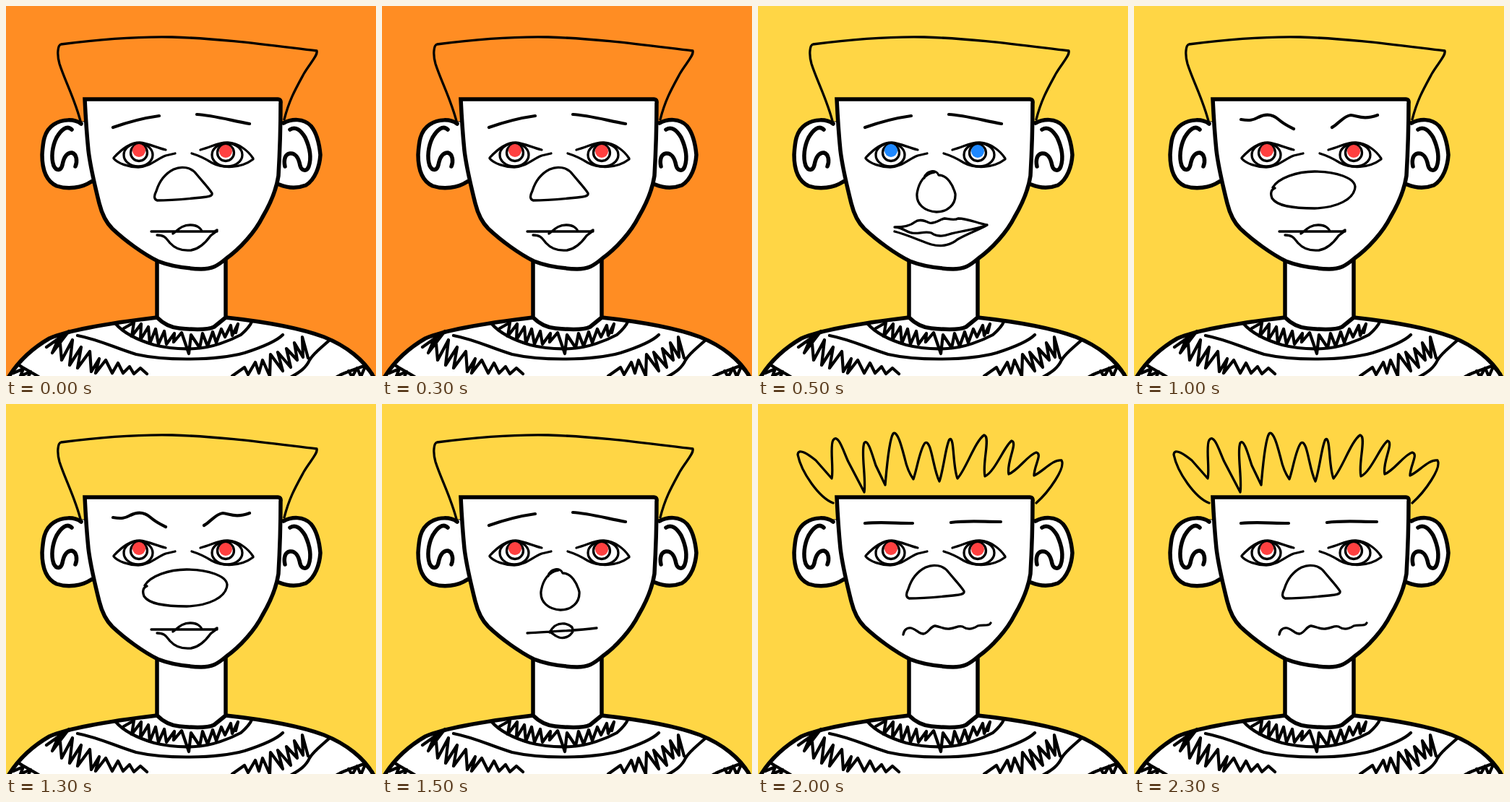
Write an HTML page that moves like this. It is 512 px wide and 512 px high and loops after 2500 ms.

```html
<!DOCTYPE html>
<html lang="en">
<head>
<meta charset="utf-8">
<title>Changing face</title>
<style>
  html, body { margin: 0; width: 100%; height: 100%; overflow: hidden; }
  svg { display: block; width: 100vw; height: 100vh; }
  path, circle, ellipse { stroke: #000; stroke-linecap: round; stroke-linejoin: round; }
  .solid { fill: #fff; stroke-width: 5.5; }
  .bold { fill: none; stroke-width: 5.5; }
  .line { fill: none; stroke-width: 4.2; }
  .fine { fill: none; stroke-width: 3.3; }
  #face { stroke-linejoin: miter; }
  #leftIris, #rightIris { stroke: none; }
</style>
</head>
<body>
<svg viewBox="0 0 512 512">
  <rect id="backdrop" width="512" height="512"/>

  <!-- jumper and neck -->
  <path class="solid" d="M2 516C14 496 34 475 60 460C90 447 150 438 209 431H304C350 436 400 443 440 458C470 470 497 490 510 516Z"/>
  <path class="solid" d="M209 352V431C218 440 228 445 240 446C260 448 280 448 288 444L304 431V349Z"/>
  <path class="line" d="M152 440C165 455 185 463 205 469C225 474 245 475 262 474C285 473 310 463 325 455C333 448 338 442 340 437"/>
  <path class="line" d="M163 446L177 438L174 457L187 440L186 462L197 444L199 467L207 447L211 468L219 450L222 468L233 453L232 465L243 452L253 481L256 455L268 473L272 453L279 471L286 451L291 466L298 447L303 458L311 442L313 456L321 440L318 452"/>
  <path class="line" d="M99 456C130 462 150 473 180 482C220 491 290 491 330 480C355 472 375 463 383 455"/>
  <path class="line" d="M56 472L87 450L64 480L74 457L77 490L92 462L88 497L104 472L99 501L116 478L118 506L129 488L124 508L138 490L147 508L155 494L162 508L171 499L177 509L186 501L195 509"/>
  <path class="line" d="M313 512L330 500L335 510L345 493L350 508L355 490L365 512L366 482L383 505L376 479L394 500L388 474L403 490L399 466L411 486L410 458L418 487"/>
  <path class="line" d="M447 463C436 473 425 481 420 490C415 501 406 507 395 513"/>
  <path class="line" d="M18 497C27 503 36 507 45 513M10 508L24 502L20 512L34 506L31 513M497 497C485 503 470 506 458 513M474 505L479 513L486 501L491 513L497 499L507 509"/>

  <!-- ears -->
  <path fill="#fff" stroke="none" d="M100 160H130V245H100ZM365 160H388V245H365Z"/>
  <path class="solid" d="M104 163C95 156 78 156 66 164C52 173 51 190 50 206C50 225 55 242 70 249C85 254 105 252 118 243"/>
  <path class="bold" d="M91 171C84 164 76 172 70 182C64 194 62 210 66 221C70 229 76 228 78 220C80 209 84 203 91 203C98 205 99 215 96 222"/>
  <path class="solid" d="M384 162C395 156 412 155 422 166C432 178 434 195 435 206C434 222 428 240 415 248C402 253 390 252 378 247"/>
  <path class="bold" d="M393 171C401 166 408 172 414 182C420 195 423 210 419 222C416 230 409 228 407 221C405 210 400 203 393 204C386 205 384 213 386 222"/>

  <path class="fine" id="hair"/>
  <path class="solid" id="face" d="M109 129H376Q381 129 380 135C380 170 379 200 377 235C374 255 365 275 355 292C345 312 325 335 304 350C292 360 285 364 270 364C245 363 225 359 210 353C190 343 165 325 147 308C137 298 132 285 129 273C122 245 117 225 114 200C111 170 110 150 109 129Z"/>

  <!-- eyes -->
  <path class="fine" d="M149 210C160 198 172 189 185 189C197 190 208 196 221 199M149 211C155 218 170 223 183 223C200 222 208 212 221 207L234 204"/>
  <path class="fine" d="M257 204C267 207 277 212 285 217C300 225 325 225 342 212M269 199C285 195 295 188 307 189C322 190 335 200 342 211"/>
  <ellipse class="fine" cx="183" cy="206" rx="20" ry="16"/>
  <ellipse class="fine" cx="306" cy="206" rx="21" ry="16"/>
  <circle class="fine" cx="184" cy="203" r="11.5"/>
  <circle class="fine" cx="304" cy="203" r="11.5"/>
  <circle id="leftIris" cx="184" cy="200" r="9"/>
  <circle id="rightIris" cx="304" cy="201" r="9"/>

  <path class="line" id="brows"/>
  <path class="fine" id="nose"/>
  <path class="fine" id="mouth"/>
</svg>
<script>
const hair = {
  flat: "M104 163C96 130 82 105 74 80C70 66 72 54 76 53C130 46 180 42 230 43C300 45 370 55 430 62C432 68 420 80 412 94C400 116 392 130 385 157",
  spiky: "M104 137C85 130 60 95 55 70C56 60 70 70 80 78L102 103C105 90 99 58 104 50C111 40 118 65 125 80L147 122C150 105 142 65 147 54C152 47 158 70 163 85L176 112C178 90 181 50 187 41C193 36 199 60 203 75Q207 93 215 104C220 90 224 62 231 54C240 48 242 90 251 107C257 90 260 56 265 49C272 44 269 85 276 103C287 92 301 50 313 43C322 45 310 82 314 100C328 94 342 56 351 51C360 53 343 82 347 97C360 92 374 70 385 67C394 69 382 85 382 99C394 94 408 76 420 78C426 88 403 121 385 137"
};
const brows = {
  sad: "M148 168C165 162 190 155 212 152M264 150C285 151 310 158 337 163",
  wavy: "M148 157C160 159 165 158 172 154C182 149 192 150 200 157C208 164 215 167 221 170M274 168C282 164 290 152 300 151C310 152 318 158 337 151",
  level: "M148 165C170 163 190 165 214 165M267 164C290 161 310 163 336 163"
};
const nose = {
  triangle: "M209 269C204 267 205 262 208 256C212 243 220 232 232 226C243 221 256 223 263 232C272 243 280 251 285 259C286 263 280 264 270 265C250 267 230 269 209 269Z",
  round: "M230 238C233 227 247 226 250 234C262 234 270 248 273 260C274 275 262 285 247 285C230 284 219 274 220 260C222 245 230 232 244 230",
  wide: "M192 251C200 238 225 229 250 229C280 229 305 238 306 250C305 268 280 279 250 280C220 280 198 277 191 266C188 258 190 254 195 252"
};
const mouth = {
  smirk: "M201 312H291m-1-1h2v1h-2M231 315C238 310 243 303 255 303C265 303 270 308 271 312M209 317C220 317 222 322 227 328C235 337 245 339 256 338C268 336 278 325 283 318C286 315 290 314 292 310",
  full: "M189 306C200 306 210 305 217 299C222 295 228 296 237 300C245 302 252 295 258 294C266 295 272 297 277 294C290 294 302 300 317 303M189 306C200 306 205 313 213 314C222 316 230 311 240 314C246 319 256 319 264 316C280 311 300 310 317 303M189 312C205 316 225 325 240 330C255 334 268 330 276 323C290 315 305 310 317 303",
  small: "M201 317C230 315 265 314 297 310M232 316C238 305 245 303 253 304C262 306 265 310 264 315C260 322 252 325 245 323C238 321 236 317 232 315",
  wobbly: "M201 319C202 312 207 309 212 310C220 312 222 318 229 318C236 317 238 308 245 307C252 308 258 312 265 311C274 310 277 306 283 308C290 313 298 311 304 307C312 305 320 308 322 303"
};
const orange = "#ff8d23", yellow = "#ffd645", red = "#ff4040", blue = "#1e88ff";

// backdrop, iris, hair, brows, nose, mouth
const looks = [
  [orange, red, hair.flat, brows.sad, nose.triangle, mouth.smirk],
  [yellow, blue, hair.flat, brows.sad, nose.round, mouth.full],
  [yellow, red, hair.flat, brows.wavy, nose.wide, mouth.smirk],
  [yellow, red, hair.flat, brows.sad, nose.round, mouth.small],
  [yellow, red, hair.spiky, brows.level, nose.triangle, mouth.wobbly]
];
const HOLD = 500;
const set = (id, name, value) => document.getElementById(id).setAttribute(name, value);
let shown = -1;

function draw() {
  const index = Math.floor(performance.now() / HOLD) % looks.length;
  if (index !== shown) {
    shown = index;
    const [backdrop, iris, ...shapes] = looks[index];
    set("backdrop", "fill", backdrop);
    set("leftIris", "fill", iris);
    set("rightIris", "fill", iris);
    ["hair", "brows", "nose", "mouth"].forEach((id, i) => set(id, "d", shapes[i]));
  }
  requestAnimationFrame(draw);
}
draw();
</script>
</body>
</html>
```
